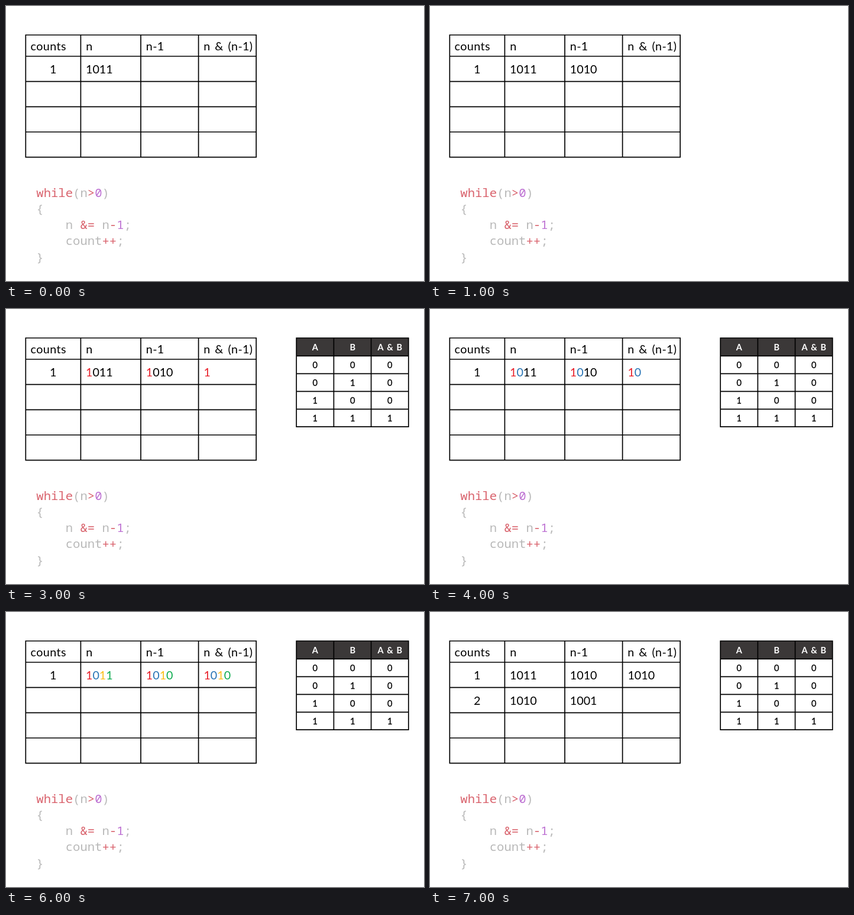
Recreate the animation shown at these times as an HTML page. Size 707 px wide and 465 px high, loop 8 s.

```html
<!DOCTYPE html>
<html lang="en">
<head>
<meta charset="utf-8">
<title>Counting set bits</title>
<style>
html, body { margin: 0; width: 100%; height: 100%; overflow: hidden; background: #fff; }
svg { display: block; width: 707px; height: 465px; }
text { white-space: pre; font-kerning: none; }
.grid { fill: none; stroke: #000; stroke-width: 1.7; }
.main { font: 19.7px Lato, sans-serif; }
.head { letter-spacing: .35px; word-spacing: 2.4px; }
.mid { text-anchor: middle; }
.truth { font: 14.6px Lato, sans-serif; stroke: #000; stroke-width: .3px; text-anchor: middle; }
.title { font-weight: 700; fill: #fff; stroke: none; word-spacing: 2.1px; }
.code { font: 20.6px "Noto Sans Mono", monospace; fill: #b9b9b9; }
.code .k { fill: #d9636d; }
.code .v { fill: #bd70d2; }

/* Hard cuts, one per second */
.s1, .s2, .s7, .b0, .b1, .b2, .b3 { animation: 8s step-end infinite; }
.s1 { animation-name: show1; }
.s2 { animation-name: show2; }
.s7 { animation-name: show7; }
.b0 { --c: #e8202a; animation-name: tint0; }
.b1 { --c: #2673b5; animation-name: tint1; }
.b2 { --c: #fcc01c; animation-name: tint2; }
.b3 { --c: #0fac50; animation-name: tint3; }
.out .b0 { animation-name: tint0, show3; }
.out .b1 { animation-name: tint1, show4; }
.out .b2 { animation-name: tint2, show5; }
.out .b3 { animation-name: tint3, show6; }

@keyframes show1 { 0% { visibility: hidden } 12.5%, 100% { visibility: visible } }
@keyframes show2 { 0% { visibility: hidden } 25%, 100% { visibility: visible } }
@keyframes show3 { 0% { visibility: hidden } 37.5%, 100% { visibility: visible } }
@keyframes show4 { 0% { visibility: hidden } 50%, 100% { visibility: visible } }
@keyframes show5 { 0% { visibility: hidden } 62.5%, 100% { visibility: visible } }
@keyframes show6 { 0% { visibility: hidden } 75%, 100% { visibility: visible } }
@keyframes show7 { 0% { visibility: hidden } 87.5%, 100% { visibility: visible } }
@keyframes tint0 { 0%, 87.5%, 100% { fill: #000 } 37.5% { fill: var(--c) } }
@keyframes tint1 { 0%, 87.5%, 100% { fill: #000 } 50% { fill: var(--c) } }
@keyframes tint2 { 0%, 87.5%, 100% { fill: #000 } 62.5% { fill: var(--c) } }
@keyframes tint3 { 0%, 87.5%, 100% { fill: #000 } 75% { fill: var(--c) } }
</style>
</head>
<body>
<svg viewBox="0 0 707 465">
  <path class="grid" d="M33.3 49H423.2V255.6H33.3ZM33.3 85H423.2M33.3 127.7H423.2M33.3 170.4H423.2M33.3 213H423.2M126.4 49V255.6M228 49V255.6M325.6 49V255.6"/>
  <g class="main">
    <g class="head">
      <text x="41.6" y="75">counts</text>
      <text x="135.2" y="75">n</text>
      <text x="236.8" y="75">n-1</text>
      <text x="334.2" y="75">n &amp; (n-1)</text>
    </g>
    <text class="mid" x="79.8" y="114">1</text>
    <text x="135" y="114"><tspan class="b0">1</tspan><tspan class="b1">0</tspan><tspan class="b2">1</tspan><tspan class="b3">1</tspan></text>
    <g class="s1">
      <text x="236.8" y="114"><tspan class="b0">1</tspan><tspan class="b1">0</tspan><tspan class="b2">1</tspan><tspan class="b3">0</tspan></text>
    </g>
    <text class="out" x="334.4" y="114"><tspan class="b0">1</tspan><tspan class="b1">0</tspan><tspan class="b2">1</tspan><tspan class="b3">0</tspan></text>
    <g class="s7">
      <text class="mid" x="79.8" y="156.7">2</text>
      <text x="135" y="156.7">1010</text>
      <text x="236.8" y="156.7">1001</text>
    </g>
  </g>

  <g class="s2">
    <path fill="#3b3838" d="M491 49H681V79.3H491Z"/>
    <path class="grid" d="M491.2 49H680.8V199.2H491.2ZM491.2 79.3H680.8M491.2 109.4H680.8M491.2 139.4H680.8M491.2 169.4H680.8M554.4 49V199.2M617.6 49V199.2"/>
    <g class="truth">
      <g class="title">
        <text x="522.7" y="69.6">A</text><text x="586.2" y="69.6">B</text><text x="649.2" y="69.6">A &amp; B</text>
      </g>
      <text x="522.7" y="99.8">0</text><text x="586.2" y="99.8">0</text><text x="649.2" y="99.8">0</text>
      <text x="522.7" y="129.8">0</text><text x="586.2" y="129.8">1</text><text x="649.2" y="129.8">0</text>
      <text x="522.7" y="159.8">1</text><text x="586.2" y="159.8">0</text><text x="649.2" y="159.8">0</text>
      <text x="522.7" y="189.8">1</text><text x="586.2" y="189.8">1</text><text x="649.2" y="189.8">1</text>
    </g>
  </g>

  <g class="code">
    <text x="51.3" y="323"><tspan class="k">while</tspan>(n<tspan class="k">&gt;</tspan><tspan class="v">0</tspan>)</text>
    <text x="51.3" y="350.2">{</text>
    <text x="100.7" y="377.3">n <tspan class="k">&amp;=</tspan> n<tspan class="k">-</tspan><tspan class="v">1</tspan>;</text>
    <text x="100.7" y="404.4">count<tspan class="k">++</tspan>;</text>
    <text x="51.3" y="431.5">}</text>
  </g>
</svg>
</body>
</html>
```
